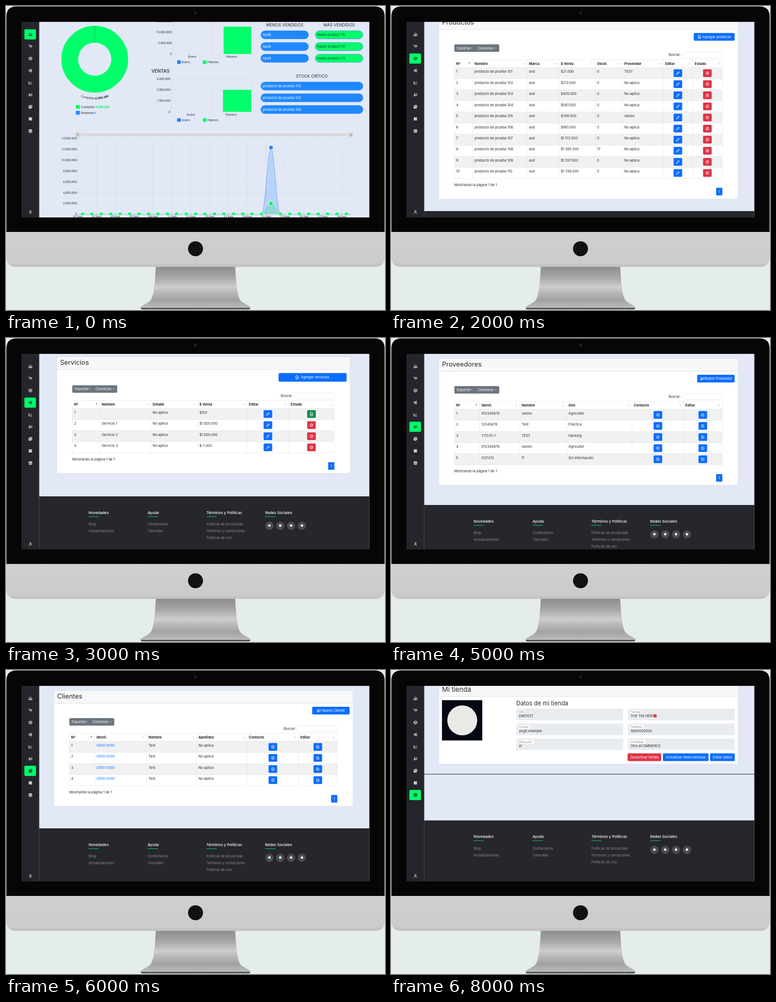
These frames come from a looping animation (835 px wide and 670 px high, 9 s). An HTML page:

```html
<!DOCTYPE html>
<html lang="es">
<head>
<meta charset="utf-8">
<title>Panel de tienda</title>
<style>
html, body { margin: 0; width: 100%; height: 100%; overflow: hidden; background: #e5ecec; }
svg { display: block; width: 835px; height: 670px; font: 7.5px Inter, "Open Sans", sans-serif; }
.chart { font: 6.7px "Noto Sans", "Open Sans", sans-serif; }
</style>
</head>
<body>
<svg id="stage" viewBox="0 0 835 670"></svg>
<script>
const INK = '#25282d', BLUE = '#0d6efd', SKY = '#2088ff', GREEN = '#00ff6a', RED = '#dc3545',
  OK = '#198754', LINE = '#dee2e6', DARK = '#25272d', PAGE = '#e2e8f6', GRAY = '#6c757d';

// Drawing helpers: each returns SVG markup.
const rect = (x, y, w, h, fill, r = 0, stroke = 'none') =>
  `<rect x="${x}" y="${y}" width="${w}" height="${h}" rx="${r}" fill="${fill}" stroke="${stroke}" stroke-width=".7"/>`;
const text = (x, y, s, { size = 7.5, fill = INK, weight = 400, anchor = 'start' } = {}) =>
  `<text x="${x}" y="${y}" font-size="${size}" fill="${fill}" font-weight="${weight}" text-anchor="${anchor}">${s}</text>`;
const path = (d, stroke, width = .7, fill = 'none') =>
  `<path d="${d}" fill="${fill}" stroke="${stroke}" stroke-width="${width}"/>`;
const dot = (x, y, r, fill, stroke = 'none') =>
  `<circle cx="${x}" cy="${y}" r="${r}" fill="${fill}" stroke="${stroke}"/>`;
const each = (list, fn) => list.map(fn).join('');
const range = n => [...Array(n).keys()];
const money = n => String(n).replace(/\B(?=(\d{3})+$)/g, '.');

const ICONS = {
  home: 'M-3.2-.5L0-3.2 3.2-.5V3.2H-3.2zM-1 3V.7H1V3',
  cart: 'M-4-3H-2.4L-1.2 1H2.5L3.5-2H-2M-1 2.8h.3M2 2.8h.3',
  box: 'M0-3.5L3.3-1.8V1.8L0 3.5-3.3 1.8V-1.8zM-3.3-1.8L0 0 3.3-1.8M0 0V3.5',
  service: 'M-3.4 0a1.6 1.6 0 1 0 3.2 0a1.6 1.6 0 1 0-3.2 0M-.2-1.8a1.6 1.6 0 1 0 3.2 0a1.6 1.6 0 1 0-3.2 0M-.2 1.8a1.6 1.6 0 1 0 3.2 0a1.6 1.6 0 1 0-3.2 0',
  chart: 'M-3.5-3V3H3.5M-2.2 1L-.5-1 .8 .2 3.2-2.2',
  people: 'M-2.8-1.3a1.3 1.3 0 1 0 2.6 0a1.3 1.3 0 1 0-2.6 0M-3.8 2.4C-3.4 .2 .4 .2 .8 2.4zM1.3-2H4M1.3 0H4M2 2H4',
  card: 'M-2-3.2H3.3V2H-2zM-3.4-1.8V3.3H2M-.5-1.2a1.1 1.1 0 1 0 2.2 0a1.1 1.1 0 1 0-2.2 0M-1 1.5C-.5 0 1.8 0 2.3 1.5',
  list: 'M-3-2.8H3V2.8H-3zM-2.6-1H2.6M-2.6 .9H2.6M-1.2-2.5V2.5M-2.2-2H2.2M-2.2 2H2.2',
  store: 'M-3-3H3L3.4-.8H-3.4zM-3-.8V3.2H3V-.8M-1 3V.8H1V3M-1.2-3V-1M1.2-3V-1',
  user: 'M-1.6-1.6a1.6 1.6 0 1 0 3.2 0a1.6 1.6 0 1 0-3.2 0M-3 3.6C-2.8 .2 2.8 .2 3 3.6',
  file: 'M-2.6-3.6H1L2.7-2V3.6H-2.6zM-1 .5H1.2M0-.7V1.8',
  pencil: 'M-3 3L-2.4 1 1.8-3.2 3.2-1.8-1 2.4zM.8-2.2L2.2-.8',
  ban: 'M-3 0a3 3 0 1 0 6 0a3 3 0 1 0-6 0M-2 2L2-2',
  info: 'M-3 0a3 3 0 1 0 6 0a3 3 0 1 0-6 0M0-.5V1.6M0-1.7V-1.2',
  edit: 'M.8-2.5H-2.6V2.6H2.5V-.5M-.8 .8L2.8-2.8',
  date: 'M-2.6-2.3H2.6V2.6H-2.6zM-2.6-1.4H2.6M-1.4-3V-2M1.4-3V-2'
};
const icon = (name, x, y, color = '#fff', scale = 1) =>
  `<g transform="translate(${x} ${y}) scale(${scale})">${path(ICONS[name], color, 1)}</g>`;

const button = (x, y, w, h, label, fill = BLUE, mark) => {
  const shift = mark ? 5.5 : 0;
  return rect(x, y, w, h, fill, 2.5) +
    (mark ? icon(mark, x + w / 2 - label.length * 1.9 - 2, y + h / 2) : '') +
    text(x + w / 2 + shift, y + h / 2 + 2.7, label, { fill: '#fff', anchor: 'middle' });
};
const iconButton = (x, y, mark, fill, w = 19, h = 17) =>
  rect(x - w / 2, y - h / 2, w, h, fill, 2) + icon(mark, x, y);
const search = (x, y, w) => text(x - 3.5, y + 8.8, 'Buscar:', { anchor: 'end' }) +
  rect(x, y, w, 13, '#fff', 2, LINE);
const toolbar = (x, y, w, items) => rect(x, y, w, 16.5, GRAY, 2.5) +
  each(items, ([dx, s, menu]) => text(x + dx, y + 11, s, { fill: '#fff' }) +
    (menu ? path(`M${x + menu} ${y + 7.4}h3.4l-1.7 1.9z`, 'none', 0, '#fff') : ''));
const TOOLS = [[5.5, 'Exportar', 36.5], [51, 'Columnas', 89.5]];

const sorter = (x, y, dir) => each([1, -1], s =>
  path(`M${x - 1.5} ${y - s * .7}L${x} ${y - s * 3.3} ${x + 1.5} ${y - s * .7}z`, 'none', 0, dir === s ? '#444' : '#cfd2d6'));

function table(cols, top, head, rows, rowH, { headH = 17.7, sort = [-1, 0], base = 11.6, sorters = true } = {}) {
  const x = cols[0], w = cols.at(-1) - x, body = top + headH, end = body + rows.length * rowH;
  return rect(x, top, w, headH, '#fff') +
    each(rows, (row, i) => {
      const y = body + i * rowH;
      return rect(x, y, w, rowH, i % 2 ? '#fff' : '#f1f1f1') +
        each(row, (s, c) => text(cols[c] + 4, y + base, s, { fill: /^0000 /.test(s) ? BLUE : INK })) +
        path(`M${x} ${y}h${w}`, LINE);
    }) +
    each(head, (s, c) => s === null ? '' : text(cols[c] + 4, top + headH / 2 + 2.7, s, { weight: 700 }) +
      (sorters ? sorter(cols[c + 1] - 7.5, top + headH / 2, c === sort[0] ? sort[1] : 0) : '')) +
    each(cols, (cx, c) => path(`M${cx} ${head[c] === null ? body : top}V${end}`, LINE)) +
    path(`M${x} ${top}h${w}M${x} ${end}h${w}`, LINE);
}

const LINKS = [
  [182, 'Novedades', 'Blog', 'Actualizaciones'],
  [312, 'Ayuda', 'Contáctanos', 'Tutoriales'],
  [441.5, 'Términos y Políticas', 'Políticas de privacidad', 'Términos y condiciones', 'Políticas de uso'],
  [571, 'Redes Sociales']
];
const footer = y => rect(73, y, 728, 200, DARK) +
  each(LINKS, ([x, title, ...items]) => text(x, y + 38.8, title, { size: 8.2, weight: 500, fill: '#fff' }) +
    rect(x, y + 44, 22.5, 1.3, '#14b65c') +
    each(items, (s, i) => text(x, y + 64.2 + i * 15.1, s, { size: 7.7, weight: 300, fill: '#a5a7ab' }))) +
  each(range(4), i => dot(580.3 + i * 23.9, y + 64.8, 9, '#4c4d52') + dot(580.3 + i * 23.9, y + 64.3, 2.6, '#fff'));

const card = (x, y, w, h, headH = 0) => rect(x, y, w, h, '#fff', 2, '#d5d9e2') +
  (headH ? rect(x + .4, y + .4, w - .8, headH, '#f8f8f8') + path(`M${x} ${y + headH}h${w}`, '#d5d9e2') : '');

// A titled card holding a searchable table.
function listPage({ title, x, top, btn: [label, mark, bw, bh], cols, head, rows, actions, foot, rowH = 24.45 }) {
  const right = 870 - x, d = bh - 17, ty = top + 94 + d, first = ty + 17.7, end = first + rows.length * rowH;
  const tx = cols[0], tr = cols.at(-1);
  return card(x, top, right - x, end + 45 - top, 27.8) +
    text(x + 7, top + 17.3, title, { size: 14.6 }) +
    button(right - 7.5 - bw, top + 35.5, bw, bh, label, BLUE, mark) +
    toolbar(tx, top + 60.5 + d, 99, TOOLS) + search(tr - 88, top + 77.3 + d, 88) +
    table(cols, ty, head, rows, rowH, { sort: [0, 1] }) +
    each(rows, (_, i) => each(actions, ([ax, name, color, name0, color0]) =>
      iconButton(ax, first + i * rowH + 12.2, !i && name0 || name, !i && color0 || color))) +
    text(tx, end + 16.7, 'Mostrando la página 1 de 1') +
    rect(tr - 13.7, end + 20.5, 13.7, 16.7, BLUE) +
    text(tr - 6.9, end + 31.5, '1', { fill: '#fff', anchor: 'middle' }) +
    (foot ? footer(foot) : '');
}

function barChart(x, ys, labels, barX, barY, centers) {
  const bottom = ys.at(-1);
  return path(each(ys, y => `M${x} ${y}H540`) + each([x, (x + 540) / 2, 540], v => `M${v} ${ys[0]}V${bottom}`), '#cfd5e2', .6) +
    rect(barX, barY, 540 - barX, bottom - barY, GREEN) +
    each(ys, (y, i) => text(x - 2, y + 2.4, labels[i], { size: 6.7, anchor: 'end' })) +
    each(['Enero', 'Febrero'], (s, i) => text(centers[i], bottom + 8.4, s, { size: 6.7, anchor: 'middle' }) +
      rect(377 + i * 56.7, bottom + 14, 8, 8, i ? GREEN : SKY, 1) +
      text(387 + i * 56.7, bottom + 20.5, s, { size: 6.7 }));
}

function dashboard() {
  const small = { size: 6.7 }, mid = { size: 9, anchor: 'middle' };
  const pill = (x, y, w, s, green) => rect(x, y - 9, w, 18, green ? GREEN : SKY, 9, SKY) +
    text(x + 4, y + 2.6, s, { fill: green ? '#173b2a' : '#fff' });
  const hill = (top, color) => path(`M563 459C571 459 577 ${top} 583.8 ${top}S597 459 604.6 459`, color, .6, color + '38');
  const marker = (x, y, c) => dot(x, y, 4.7, c, '#fff');
  return `<g class="chart">` +
    `<circle cx="195.5" cy="117.3" r="55" fill="none" stroke="${GREEN}" stroke-width="37"/>` +
    path('M195.5 43.8V80.8', '#078c3e', .6) +
    text(195.5, 34.8, 'Restante:0%', { size: 6.7, anchor: 'middle' }) +
    `<path id="arc" d="M107 117.3A88.5 88.5 0 0 0 284 117.3" fill="none"/>` +
    `<text fill="${INK}" text-anchor="middle"><textPath href="#arc" startOffset="50%">Cumplido:<tspan font-weight="700">4.599.204</tspan></textPath></text>` +
    each([['Cumplido', '4.599.204', GREEN, 197], ['Restante', '0', SKY, 193.5]], ([s, n, c, nx], i) =>
      rect(154, 218 + i * 13, 8.5, 8.5, c, 1) + text(165, 224.7 + i * 13, s, small) +
      text(nx, 224.7 + i * 13, n, { size: 6.7, weight: 700, fill: i ? c : '#08ec68' })) +
    barChart(367, [33.3, 57.4, 81.6, 105.8], ['15.000.000', '10.000.000', '5.000.000', '0'], 479.5, 45.5, [410.5, 497]) +
    barChart(364, [160.5, 184.7, 209, 233.2], ['3.000.000', '2.000.000', '1.000.000', '0'], 478, 184.7, [407.5, 496]) +
    path('M158 283.8H760', '#d9d9d9', 6) +
    each([158, 760], x => dot(x, 283.8, 7, '#d9d9d9', '#eee') + path(`M${x - 1.2} 281v5.6m2.4-5.6v5.6`, '#777', .8)) +
    each(range(8), i => path(`M158 ${459 - i * 23.85}H760.5`, '#cfd5e2', .6) +
      text(156, 461.2 - i * 23.85, money(i * 2000000), { size: 6.7, anchor: 'end' })) +
    each(range(15), i => path(`M${158 + i * 41.53} 292V459`, '#cfd5e2', .6) +
      text(158 + i * 41.53, 467.3, String(i * 2 + 1).padStart(2, '0') + ' Feb', { size: 6.7, anchor: 'middle' })) +
    hill(312, SKY) + hill(435.2, '#00e56a') +
    `<g clip-path="url(#plot)">` + path('M158 459H563M604.6 459H760', '#00d966', .6) +
    each(range(29), i => i === 20 ? '' : marker(168.4 + i * 20.77, 459, GREEN)) + '</g>' +
    marker(583.8, 312, SKY) + marker(583.8, 435.2, '#00f268') + '</g>' +
    text(320.5, 147, 'VENTAS', { size: 10, weight: 500 }) +
    text(614, 45.2, 'MENOS VENDIDOS', mid) + text(734, 45.2, 'MÁS VENDIDOS', mid) + text(674, 158.2, 'STOCK CRÍTICO', mid) +
    each(range(3), i => pill(561.5, 63.6 + i * 25.8, 105, ['np46', 'np26', 'np44'][i]) +
      pill(681.3, 63.6 + i * 25.8, 105, 'Name product ' + [76, 74, 73][i], true) +
      pill(561.5, 176.5 + i * 25.8, 225, 'producto de prueba ' + (102 + i)));
}

function sales() {
  const id = '0000 0000 0000 0000', no = 'no aplica', day = '2024-02-21';
  const rows = [['C', '', no, no, '$ 12.341.934', day], ['V', '', id, 'LunaMi', '$ 200', day],
    ['V', '', id, 'LunaMi', '$ 2.000', day], ['V', '', no, no, '$ 2.000.000', day], ['V', '', no, no, '$ 0', day]];
  const blue = { fill: BLUE }, white = { fill: '#fff' };
  const total = (x, w, label, sum, mark) => rect(x, 48.8, w, 30, BLUE, 2.5) + icon(mark, x + 10, 59) +
    text(x + 17, 61.7, label, white) + text(x + w / 2, 73, sum, { fill: '#fff', anchor: 'middle' });
  return card(105.7, 20, 659, 336.5, 21.2) +
    button(112.8, 48.8, 97.2, 30, 'Generar nueva venta', BLUE, 'list') +
    button(214, 48.8, 105, 30, 'Generar nueva compra', BLUE, 'info') +
    total(598.6, 73.5, 'Ventas totales', '$2.004.420', 'chart') + total(676, 81.3, 'Compras totales', '$12.403.334', 'chart') +
    rect(579, 86, 18, 16.3, '#f8f9fa', 2, LINE) + icon('date', 588, 94, '#444') +
    each([597, 677], x => rect(x, 86, 80, 16.3, '#fff', 0, LINE) + text(x + 5, 97, 'dd-mm-aaaa', { size: 8 }) + icon('date', x + 70, 94.3, '#111')) +
    toolbar(151.3, 117, 131.5, [[5.5, 'Exportar', 36.5], [51, 'Todos'], [83.5, 'Columnas', 122]]) + search(630.5, 134.5, 88) +
    table([151.3, 172, 194, 325, 422, 496, 569, 656.5, 718.5], 151,
      ['Nº', null, 'Ident.', 'Nombre', 'Total', 'Fecha', 'Nota Venta', 'Anular'], rows, 27.15, { sort: [5, -1], base: 12 }) +
    each(range(5), i => {
      const y = 168.7 + i * 27.15;
      return text(175.5, y + 12, 16 - i, blue) + text(418.5, y + 12, ['+10', '+1', '+12', '+2', '+2'][i], { fill: BLUE, anchor: 'end' }) +
        (i ? iconButton(612.3, y + 13.8, 'file', RED, 21, 19) : '') + iconButton(687, y + 13.8, 'file', RED, 21, 19);
    }) +
    text(151.3, 321.2, 'Mostrando la página 1 de 4') +
    rect(658.8, 325, 59.7, 16.7, '#fff', 2, LINE) + rect(658.8, 325, 13.7, 16.7, BLUE, 1) + path('M687.5 325v16.7m15.5-16.7v16.7', LINE) +
    each([665.7, 680, 695.3, 711], (x, i) => text(x, 336, i + 1, { fill: i ? BLUE : '#fff', anchor: 'middle' })) +
    footer(378.5);
}

const product = i => [i + 1, 'producto de prueba ' + (101 + i), 'asd', '$' + money(21000 + 192000 * i),
  i === 7 ? '17' : '0', i === 0 ? 'TEST' : i === 4 ? 'ramiro' : 'No aplica'];

function quote() {
  const field = (x, y, w, s) => rect(x, y, w, 25.7, '#fff', 3, LINE) + text(x + 6, y + 15.5, s);
  const note = { size: 7.7, fill: GRAY };
  return card(87, 20, 283, 237.5) +
    text(94, 51, 'Por favor, ingrese su DNI y la búsqueda se realizará automáticamente.', note) +
    text(94, 101.8, 'Si el cliente no está registrado, por favor complete los campos y continue.', note) +
    field(94, 61.2, 269, 'DNI') + field(94, 112, 129, 'Nombre') + field(233.7, 112, 129, 'Apellidos') +
    field(94, 144.6, 269, 'Correo') + field(94, 184.6, 269, 'Telefono') + field(94, 217.4, 269, 'Dirección') +
    card(381.6, 20, 401, 124) + rect(382, 120.5, 400.2, 23.2, '#f7f7f7') + path('M382 120.5h400', '#d5d9e2') +
    table([389, 419, 433, 508, 584, 661, 709, 775], 57, ['Nº', '', 'Producto', '($)Precio', 'Cantidad', 'Total', 'Entrega'], [], 18, { sorters: false }) +
    rect(389, 74.7, 386, 19, 'none', 0, LINE) +
    text(582, 86.8, 'No se han encontrado registros', { anchor: 'middle' }) +
    text(389, 109.5, 'No hay registros disponibles') +
    button(729.5, 124, 45.7, 16.3, 'Cotizar', '#5f9ffc', 'list') +
    card(87, 265.5, 695.5, 230) + rect(87, 265.5, 695.5, 22.8, '#cfe2ff', 2) +
    text(96, 279.6, 'Productos', { weight: 600, fill: '#10294d' }) + path('M765.5 279l4-4 4 4', '#10294d', 1) +
    search(687.3, 295.5, 86.3) +
    table([96, 148, 339, 473, 581, 661, 773.5], 312, ['Nº', 'Nombre', 'Marca', '($) Precio', 'Cant.', 'Proveedor'],
      range(8).map(product), 18.22, { headH: 18.5 });
}

function shop() {
  const fields = [['DNI', 'DNITEST'], ['Tienda', 'THE TIN HERON'], ['Correo', 'yo@t.example'],
    ['Teléfono', '5600000000'], ['Dirección', 'st'], ['Actividad', 'Otro eCOMMERCE']];
  return card(105.5, 20, 659, 187.5, 38.7) + text(112.3, 48.3, 'Mi tienda', { size: 14.8 }) +
    rect(112.3, 66.5, 88.8, 88.8, '#030712') + dot(157, 111, 33, '#e9e9e6') +
    text(276, 78.2, 'Datos de mi tienda', { size: 13 }) +
    each(fields, ([label, value], i) => {
      const x = i % 2 ? 522 : 276, y = 85 + (i >> 1) * 32.9;
      return rect(x, y, 235.5, 25.8, '#e9ecef', 3) + rect(x + 4, y + 3.5, label.length * 3.4 + 4, 8.3, '#fff', 2) +
        text(x + 6, y + 10, label, { size: 6.3, fill: '#777d83' }) + text(x + 6, y + 19, value);
    }) +
    rect(578, 97.5, 7, 7, '#d94848', 1) +
    button(521.3, 183.7, 74, 17, 'Desactivar tienda', RED) + button(599, 183.7, 100.5, 17, 'Actualizar meta mensual') +
    button(703, 183.7, 54.3, 17, 'Editar datos') + path('M73 229.7H801', '#111', 1) + footer(331.5);
}

const products = () => listPage({
  title: 'Productos', x: 105.5, top: 24, btn: ['Agregar producto', 'file', 90, 17],
  cols: [139.5, 180, 300, 370, 450, 510, 600, 665, 730],
  head: ['Nº', 'Nombre', 'Marca', '$ Venta', 'Stock', 'Proveedor', 'Editar', 'Estado'],
  rows: range(10).map(product), actions: [[632, 'pencil', BLUE], [697, 'ban', RED]], foot: 452
});
const services = () => listPage({
  title: 'Servicios', x: 112, top: 41.7, btn: ['Agregar servicios', 'file', 150, 19],
  cols: [146, 207, 319, 422, 531, 623, 723.5], head: ['Nº', 'Nombre', 'Detalle', '$ Venta', 'Editar', 'Estado'],
  rows: [[1, '', 'No aplica', '$100'], [2, 'Servicio 1', 'No aplica', '$1.000.000'],
    [3, 'Servicio 2', 'No aplica', '$1.000.000'], [4, 'Servicio 3', 'No aplica', '$-1.000']],
  actions: [[577, 'pencil', BLUE], [673, 'ban', RED, 'file', OK]], foot: 349
});
const reports = () => listPage({
  title: 'Gastos', x: 105.5, top: 45.5, btn: ['Nuevo gasto', 'chart', 82, 17],
  cols: [139.5, 195.5, 320, 440, 560, 644.5, 730], head: ['Nº', 'Nombre', 'Detalle', 'Total', 'Fecha', 'Editar'],
  rows: range(3).map(i => [i + 1, 'Gasto ' + (i + 1), 'No aplica', '$1.000', '2024-02-21']),
  actions: [[687, 'edit', BLUE]], foot: 335
});
const suppliers = () => listPage({
  title: 'Proveedores', x: 105.5, top: 45.5, btn: ['Nuevo Proveedor', 'people', 82.5, 17],
  cols: [139.5, 195.5, 284, 387, 531, 644.5, 730], head: ['Nº', 'Identi.', 'Nombre', 'Giro', 'Contacto', 'Editar'],
  rows: [[1, '912345678', 'ramiro', 'Agricultor'], [2, '12345678', 'Test', 'Práctica'], [3, '1.111.111-1', 'TEST', 'Hacking'],
    [4, '912345678', 'ramiro', 'Agricultor'], [5, '0121212', 'f1', 'Sin información']],
  actions: [[588, 'info', BLUE], [687, 'edit', BLUE]], foot: 368
});
const clients = () => listPage({
  title: 'Clientes', x: 105.5, top: 45.5, btn: ['Nuevo Cliente', 'people', 82.5, 17],
  cols: [139.5, 195.5, 310, 420, 531, 644.5, 730], head: ['Nº', 'Identi.', 'Nombre', 'Apellidos', 'Contacto', 'Editar'],
  rows: range(4).map(i => [i + 1, '0000 0000', 'Test', 'No aplica']),
  actions: [[588, 'info', BLUE], [687, 'edit', BLUE]], foot: 349
});

const MENU = ['home', 'cart', 'box', 'service', 'chart', 'people', 'card', 'list', 'store'];
const sidebar = active => rect(34, 35, 39, 432, '#24262b') + path('M73 35V467', '#55575c', .8) +
  each(MENU, (name, i) => {
    const y = 62.5 + i * 26.62, on = i === active;
    return (on ? rect(40.5, y - 11.2, 25.5, 22.4, GREEN, 2.5) : '') + icon(name, 53.8, y, on ? '#123' : '#fff');
  }) + icon('user', 53.8, 454);

const stops = list => each(list, ([o, c]) => `<stop offset="${o}" stop-color="${c}"/>`);
const device = `<defs>
  <clipPath id="screen"><rect x="34" y="35" width="766.5" height="431"/></clipPath>
  <clipPath id="plot"><rect x="150" y="440" width="620" height="20.5"/></clipPath>
  <linearGradient id="chin" x2="0" y2="1">${stops([[0, '#d0d0d0'], [.9, '#cbcbcb'], [1, '#bdbdbd']])}</linearGradient>
  <linearGradient id="stand" x2="0" y2="1">${stops([[0, '#8d8d8f'], [.25, '#a5a5a6'], [.5, '#cdcdcd'], [.65, '#b5b5b6'], [.8, '#a3a3a4'], [1, '#bcbcbd']])}</linearGradient>
  </defs>` +
  path('M330 574H505C507 610 509 637 516 648C523 657 539 660 539 666H296C296 660 312 657 319 648C326 637 328 610 330 574z', 'none', 0, 'url(#stand)') +
  path('M296 665.5H539L536 668.5H299z', 'none', 0, '#434345') +
  path('M1 497H834V553Q834 575 812 575H23Q1 575 1 553z', 'none', 0, 'url(#chin)') +
  path('M1 498V23Q1 1 23 1H812Q834 1 834 23V498z', 'none', 0, '#060606') +
  dot(417.5, 15, 3, '#25262a') + dot(417.5, 535, 16.5, '#111');

const PAGES = [dashboard, sales, products, services, reports, suppliers, clients, quote, shop];
const stage = document.getElementById('stage');
stage.innerHTML = device + '<g clip-path="url(#screen)">' +
  each(PAGES, (draw, i) => `<g class="page">${rect(73, 35, 728, 432, PAGE)}${draw()}${sidebar(i)}</g>`) + '</g>';
const pages = stage.querySelectorAll('.page');

const start = performance.now();
function tick() {
  const current = Math.floor((performance.now() - start) / 1000) % PAGES.length;
  pages.forEach((p, i) => p.style.display = i === current ? '' : 'none');
  requestAnimationFrame(tick);
}
tick();
</script>
</body>
</html>
```
